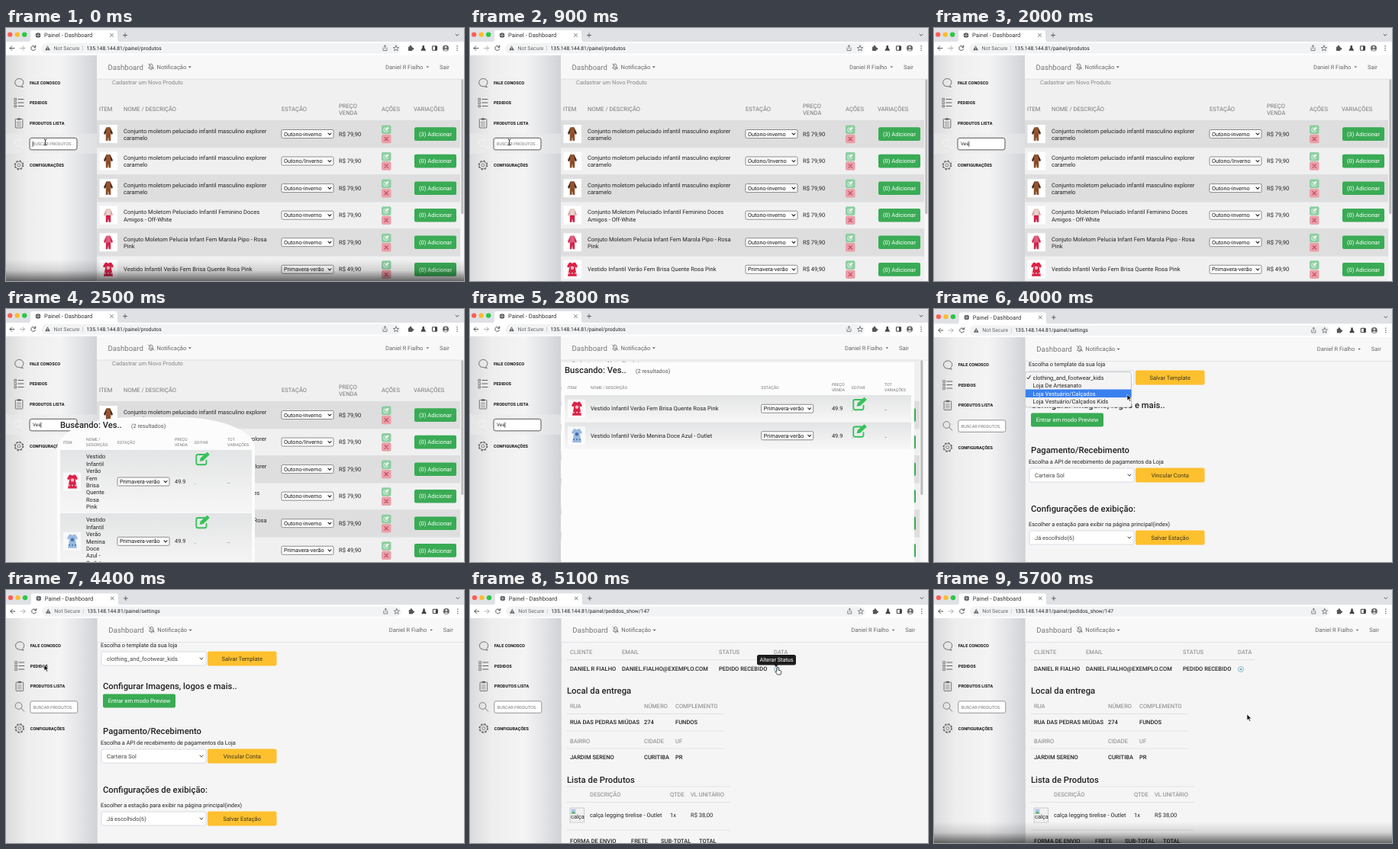
Recreate the animation shown at these times as an HTML page. Size 600 by 332 pixels, loop 5.9 s.

```html
<!DOCTYPE html>
<html lang="pt">
<head>
<meta charset="utf-8">
<style>
html, body { margin: 0; width: 100%; height: 100%; overflow: hidden; background: #fff; }
svg { display: block; width: 600px; height: 332px; font-family: Roboto, "Liberation Sans", sans-serif; text-rendering: geometricPrecision; }
</style>
</head>
<body>
<svg id="stage" viewBox="0 0 600 332"></svg>
<script>
const LOOP = 5900, STEP = 100;
const GRAY = '#777', DARK = '#222', GREEN = '#3aab55', YELLOW = '#fdc02e';
const USER = 'Daniel R Fialho';

const defs = `<defs>
<linearGradient id="side"><stop stop-color="#dadadc"/><stop offset=".25" stop-color="#eeeeef"/><stop offset=".6" stop-color="#f4f4f5"/><stop offset=".82" stop-color="#e2e3e6"/><stop offset="1" stop-color="#d0d2d6"/></linearGradient>
<linearGradient id="row" x2="0" y2="1"><stop stop-color="#e3e4e5"/><stop offset="1" stop-color="#f7f7f7"/></linearGradient>
<linearGradient id="shade" x2="0" y2="1"><stop stop-opacity="0"/><stop offset=".5" stop-opacity=".13"/><stop offset="1" stop-opacity=".58"/></linearGradient>
</defs>`;

// y is the visual middle of the line
const text = (x, y, s, size = 7.55, fill = DARK, weight = 400, anchor = 'start') =>
  `<text x="${x}" y="${y + size * .36}" font-size="${size}" fill="${fill}" font-weight="${weight}" text-anchor="${anchor}">${s}</text>`;
const rect = (x, y, w, h, fill, r = 0, extra = '') =>
  `<rect x="${x}" y="${y}" width="${w}" height="${h}" rx="${r}" fill="${fill}" ${extra}/>`;
const circle = (x, y, r, fill, extra = '') => `<circle cx="${x}" cy="${y}" r="${r}" fill="${fill}" ${extra}/>`;
const line = (d, color = '#555', w = 1) =>
  `<path d="${d}" fill="none" stroke="${color}" stroke-width="${w}" stroke-linecap="round" stroke-linejoin="round"/>`;
const shape = (d, fill, extra = '') => `<path d="${d}" fill="${fill}" ${extra}/>`;
const move = (x, y, s, extra = '') => `<g transform="translate(${x} ${y})" ${extra}>${s}</g>`;
const rule = (y, x1, x2) => line(`M${x1} ${y}H${x2}`, '#dcdee1', .8);
const lerp = (a, b, p) => a + (b - a) * p;
const clamp = v => Math.max(0, Math.min(1, v));

const button = (x, y, w, h, s, bg, fg) =>
  rect(x, y, w, h, bg, 2) + text(x + w / 2, y + h / 2, s, 7.5, fg, 400, 'middle');
const smallSelect = (x, y, s) =>
  rect(x, y - 5.5, 68, 11, '#fff', 1.5, 'stroke="#707070" stroke-width=".8"') +
  text(x + 3, y, s, 7.3, '#111') + line(`M${x + 61} ${y - 1}l2 2.2 2-2.2`, '#222', 1.1);
const bigSelect = (x, y, s) =>
  rect(x, y, 137, 18, '#fff', 2, 'stroke="#ced4da" stroke-width=".8"') +
  text(x + 7, y + 9, s, 7.5, '#444') + line(`M${x + 129} ${y + 8}l2 2.2 2-2.2`, '#444', 1);
const pencil = (x, y, k, color) => move(x, y, `<g transform="scale(${k})">` +
  line('M3-5H-5Q-7-5-7-3V5Q-7 7-5 7H3Q5 7 5 5V2', color, 1.7) +
  shape('M-3 3L-2-1 6-8 9-5 1 2.4Z', color) + '</g>');

const suit = (top, legs, sleeves) =>
  shape('M-2.5-8.5H2.5L6-1 4.5 1 2.5-2H-2.5L-4.5 1-6-1Z', sleeves) +
  shape('M-2.5-8.5H2.5L3.2 1H-3.2Z', top) +
  shape('M-3.2 0H3.2V9H.7L0 4-.7 9H-3.2Z', legs);
const dress = (main, dot) =>
  shape('M-4-9H-2Q0-7 2-9H4L7-4 5-2 3.5-4 6 9H-6L-3.5-4-5-2-7-4Z', main) +
  circle(0, -2, 2.2, dot) + [-4, 0, 4].map(x => circle(x, 5, 1, dot)).join('');
const brown = suit('#9a5128', '#8d4c29', '#33302f');
const red = dress('#db2146', '#f7bcc6'), blue = dress('#9ab9df', '#3f70b3');

const items = [
  ['Conjunto moletom peluciado infantil masculino explorer', 'caramelo', 'Outono-inverno', '79', brown],
  ['Conjunto moletom peluciado infantil masculino explorer', 'caramelo', 'Outono/Inverno', '79', brown],
  ['Conjunto moletom peluciado infantil masculino explorer', 'caramelo', 'Outono-inverno', '79', brown],
  ['Conjunto Moletom Peluciado Infantil Feminino Doces', 'Amigos - Off-White', 'Outono-inverno', '79', suit('#e5d4cd', '#cf2048', '#d8a5a2')],
  ['Conjuto Moletom Pelucia Infant Fem Marola Pipo - Rosa', 'Pink', 'Outono-inverno', '79', suit('#e0607f', '#d02750', '#d02750')],
  ['Vestido Infantil Verão Fem Brisa Quente Rosa Pink', '', 'Primavera-verão', '49', red],
];

function productList() {
  const heads = [[122, 'ITEM'], [154, 'NOME / DESCRIÇÃO'], [361, 'ESTAÇÃO'], [492, 'AÇÕES'], [534, 'VARIAÇÕES']];
  let s = rect(119, 67, 490, 265, '#f0f0f1') + text(139, 71, 'Cadastrar um Novo Produto', 7.5, '#888');
  s += heads.map(([x, h]) => text(x, 106.5, h, 7.6, GRAY)).join('');
  s += text(436, 102, 'PREÇO', 7.6, GRAY) + text(436, 111, 'VENDA', 7.6, GRAY);
  items.forEach(([a, b, season, price, art], i) => {
    const y = 139 + i * 35.55;
    s += rect(119, y - 17.6, 476, 35.5, i % 2 ? '#f0f0f1' : '#dededf') + rule(y - 17.6, 119, 595);
    s += rect(122.5, y - 12, 23.5, 24, '#fff') + move(134, y, art);
    s += text(154, b ? y - 4.2 : y, a) + text(154, y + 5.2, b);
    s += smallSelect(361, y, season) + text(436, y, `R$ ${price},90`);
    s += rect(492, y - 11.5, 12.5, 11.5, '#8dcea0', 2) + pencil(498, y - 5.7, .42, '#fff');
    s += rect(492, y + .8, 12.5, 11.5, '#e9a0a8', 2) + line(`M496 ${y + 4.4}l4.4 4.4m0-4.4l-4.4 4.4`, '#c9485a', 1.2);
    s += button(535, y - 8.7, 55, 17.6, `(${i ? 0 : 3}) Adicionar`, GREEN, '#fff');
  });
  return s + rect(595.5, 67, 4.5, 265, '#f7f7f7') + rect(596.3, 67, 3, 177, '#bbb', 1.5);
}

function wrap(s, max) {
  return s.split(' ').reduce((rows, word) => {
    const last = rows.length - 1;
    if (last >= 0 && (rows[last] + ' ' + word).length <= max) rows[last] += ' ' + word;
    else rows.push(word);
    return rows;
  }, []);
}

// Search results, opening out of the search field
function results(p) {
  const x = lerp(14, 120, p), y = lerp(214, 70, p), w = lerp(56, 462, p);
  const grow = Math.max(0, w - 259), width = Math.max(w, 180);
  const rx = Math.min(width / 2, 200 * (1 - p)), ry = 80 * (1 - p);
  const nome = x + 38, est = x + 79 + grow * .9, right = x + grow * .985;
  const outline = `M${x} 340V${y + ry}a${rx} ${ry} 0 0 1 ${rx} ${-ry}H${x + width - rx}a${rx} ${ry} 0 0 1 ${rx} ${ry}V340Z`;
  const head = (hx, a, b) => b
    ? text(hx, y + 29.5, a, 5.3, GRAY) + text(hx, y + 36, b, 5.3, GRAY)
    : text(hx, y + 33, a, 5.3, GRAY);
  let s = shape(outline, '#fcfcfc');
  s += text(x + 4, y + 10, 'Buscando: Ves..', 11.2, DARK, 500) + text(x + 97, y + 11.5, '(2 resultados)', 7.3, '#555');
  s += head(x + 7.5, 'ITEM') + (grow < 30 ? head(nome, 'NOME /', 'DESCRIÇÃO') : head(nome, 'NOME / DESCRIÇÃO'));
  s += head(est, 'ESTAÇÃO') + head(right + 154, 'PREÇO', 'VENDA') + head(right + 180, 'EDITAR') + head(right + 223, 'TOT', 'VARIAÇÕES');
  let top = y + 43;
  [['Vestido Infantil Verão Fem Brisa Quente Rosa Pink', red],
   ['Vestido Infantil Verão Menina Doce Azul - Outlet', blue]].forEach(([name, art]) => {
    const rows = wrap(name, (est - nome - 6) / 4.2);
    const h = Math.max(35.5, rows.length * 9.4 + 7.8), mid = top + h / 2;
    s += rect(x + 4, top, width - 8, h - .5, 'url(#row)');
    s += rect(x + 8, mid - 12, 23, 24, '#fff', 0, 'opacity=".7"') + move(x + 20, mid, art);
    rows.forEach((r, i) => s += text(nome, mid + (i - (rows.length - 1) / 2) * 9.4, r, 7.5));
    s += smallSelect(est, mid, 'Primavera-verão') + text(right + 154, mid, '49.9', 7.4);
    s += pencil(right + 190, top + 11.5, 1.1, '#37c25c');
    s += text(right + 180, mid + 1, '.', 7) + text(right + 223, mid, '..', 7);
    top += h;
  });
  return `<g opacity="${clamp(p * 2.5)}">${s}</g>`;
}

const title = (y, s) => text(127, y, s, 11.3, DARK, 500);

function settings(open) {
  const action = (y, s) => button(264, y, 90.5, 19, s, YELLOW, '#3b3520');
  let s = rect(119, 67, 481, 265, '#f5f5f6');
  s += text(124, 72.5, 'Escolha o template da sua loja', 7.4) + bigSelect(125, 81, 'clothing_and_footwear_kids') + action(80.5, 'Salvar Template');
  s += title(126, 'Configurar Imagens, logos e mais..') + button(127, 136.5, 95, 18, 'Entrar em modo Preview', GREEN, '#fff');
  s += title(185, 'Pagamento/Recebimento') + text(124, 200.8, 'Escolha a API de recebimento de pagamentos da Loja', 7.4);
  s += bigSelect(125, 209, 'Carteira Sol') + action(208.5, 'Vincular Conta');
  s += title(262, 'Configurações de exibição:') + text(124, 282.5, 'Escolher a estação para exibir na página principal(index)', 7.4);
  s += bigSelect(125, 291, 'Já escolhido(6)') + action(290.5, 'Salvar Estação');
  if (!open) return s;
  s += rect(119.5, 82.5, 139, 46.5, '#f4f4f5', 3, 'stroke="#b9b9bb" stroke-width=".8"') + rect(119.5, 105.5, 139, 10.6, '#3a80ee');
  s += line('M122 90l1.5 2 2.8-4.5', '#222', 1);
  ['clothing_and_footwear_kids', 'Loja De Artesanato', 'Loja Vestuário/Calçados', 'Loja Vestuário/Calçados Kids']
    .forEach((o, i) => s += text(129.5, 89.8 + i * 10.5, o, 7.5, i == 2 ? '#fff' : DARK));
  return s;
}

function order(tip) {
  const cells = (y, xs, names, head) =>
    names.map((n, i) => text(xs[i], y, n, 7.55, head ? '#808080' : DARK, head ? 400 : 500)).join('');
  const a = [131, 199, 326, 398], b = [131, 228, 269], c = [157, 262, 289];
  let s = rect(119, 67, 481, 265, '#f5f5f6');
  s += cells(81.5, a, ['CLIENTE', 'EMAIL', 'STATUS', 'DATA'], 1) + rule(91.5, 127, 420);
  s += cells(103, a, [USER.toUpperCase(), 'DANIEL.FIALHO@EXEMPLO.COM', 'PEDIDO RECEBIDO']);
  s += circle(402, 104, 3.5, '#e8f3f8', 'stroke="#7eabc1" stroke-width=".8"') + circle(402, 104, 1.3, '#7eabc1');
  s += title(132, 'Local da entrega') + cells(152.5, b, ['RUA', 'NÚMERO', 'COMPLEMENTO'], 1) + rule(162.5, 127, 332);
  s += cells(173.5, b, ['RUA DAS PEDRAS MIÚDAS', '274', 'FUNDOS']) + rule(185, 127, 332);
  s += cells(198, b, ['BAIRRO', 'CIDADE', 'UF'], 1) + rule(208, 127, 332) + cells(219, b, ['JARDIM SERENO', 'CURITIBA', 'PR']);
  s += title(248.5, 'Lista de Produtos') + rule(258, 127, 340) + cells(268.5, c, ['DESCRIÇÃO', 'QTDE', 'VL UNITÁRIO'], 1) + rule(278.5, 127, 340);
  s += rect(131, 286, 18.5, 19, '#f2f2f2', 0, 'stroke="#bbb" stroke-width=".7"') + rect(132.5, 287.5, 6, 6, '#a9c8e5') +
    shape('M132.5 293.5l3-3 3 3Z', '#5ba65c') + text(132, 297.5, 'calça', 7.5);
  s += text(157, 295.5, 'calça legging tirelise - Outlet') + text(262, 295.5, '1x') + text(289, 295.5, 'R$ 38,00');
  s += rule(315, 127, 340) + cells(329, [131, 211, 250, 300], ['FORMA DE ENVIO', 'FRETE', 'SUB-TOTAL', 'TOTAL']);
  if (tip) s += rect(376, 85, 51, 13.5, '#1d1d1d', 2.5) + shape('M398.5 98h5l-2.5 3Z', '#1d1d1d') +
    text(401.5, 91.7, 'Alterar Status', 7.3, '#fff', 400, 'middle');
  return s;
}

function browser(path) {
  let s = rect(-2, -4, 610, 22, '#dfe1e5') + shape('M29 18Q32 18 32 15V6Q32 3 35 3H143Q146 3 146 6V15Q146 18 149 18Z', '#fff');
  ['#fb5f57', '#fcbc2f', '#2bc840'].forEach((c, i) => s += circle(5.2 + i * 9.5, 8.6, 3.2, c));
  s += circle(42, 9.5, 3.3, '#54585c') + line('M39.6 9.5h4.8M42 7v5', '#ddd', .6) + text(50, 9.3, 'Painel - Dashboard', 7.6, '#333');
  s += line('M136.5 7.5l4 4m0-4l-4 4', '#555', .8) + line('M153.5 9.5h5m-2.5-2.5v5', '#555', .9);
  s += line('M589 8.2l2 2 2-2', '#444', .9);
  s += rect(-2, 18, 610, 17.5, '#fff') + rect(46, 20, 471, 13.5, '#f1f3f4', 6.7);
  s += line('M11 26.5H5m2.7-2.7L5 26.5l2.7 2.7', '#555', 1) + line('M18.5 26.5h6m-2.7-2.7l2.7 2.7-2.7 2.7', '#b0b0b0', 1);
  s += line('M38.5 25a3 3 0 1 0 .2 2.5M38.8 23v2.3h-2.3', '#555', 1);
  s += shape('M54.5 23.2l3.4 6h-6.8Z', '#5f6368') + line('M54.5 25.5v1.4m0 1.2v.1', '#fff', .7);
  s += text(62.5, 26.5, 'Not Secure', 6.9, '#666') + line('M100.5 23.5v6', '#bbb', .6) + text(105.5, 26.5, '135.148.144.81/painel/' + path, 6.8, '#222');
  s += line('M494 26v3.5h5V26m-2.5 1v-4.2m-1.5 1.4l1.5-1.5 1.5 1.5', '#666', .8);
  s += line('M511 23l1 2.4 2.6.2-2 1.7.7 2.5-2.3-1.4-2.3 1.4.7-2.5-2-1.7 2.6-.2Z', '#666', .8);
  s += rect(527, 24.5, 5.5, 5.5, '#555', .8) + circle(530, 24, 1.3, '#555') + circle(533, 27.2, 1.3, '#555');
  s += shape('M545.5 23h2.5v2.5l2.2 4.3h-6.9l2.2-4.3Z', '#444') + rect(558.5, 23.7, 6, 5.5, 'none', .8, 'stroke="#444" stroke-width="1.1"') + rect(562, 23.7, 2.5, 5.5, '#444');
  s += circle(576, 26.5, 4, '#666') + circle(576, 25.2, 1.4, '#ddd') + shape('M573.3 29q2.7-3 5.4 0-2.7 2-5.4 0Z', '#ddd');
  [23.8, 26.5, 29.2].forEach(y => s += circle(591, y, .75, '#555'));
  return s;
}

function sidebar(active, typed, caret) {
  const label = (y, s) => text(31, y, s, 5.6, '#111', 700);
  let s = rect(-2, 35.5, 121, 300, 'url(#side)');
  if (active) s += rect(-2, 138.5, 121, 26.5, '#eee', 0, 'opacity=".5"');
  s += label(71.5, 'FALE CONOSCO') + label(98, 'PEDIDOS') + label(124.8, 'PRODUTOS LISTA') + label(180, 'CONFIGURAÇÕES');
  s += line('M13.5 75.5a5.7 5.2 0 1 1 7 .4l2 1.7-4.5-.9a5.7 5.2 0 0 1-4.5-1.2', '#555', .8);
  [93.5, 98, 102.5].forEach(y => s += rect(11, y - 1.2, 2.6, 2.6, 'none', 0, 'stroke="#555" stroke-width=".7"') + line(`M16 ${y}H23`, '#555', .9));
  s += rect(12.3, 119.5, 9.6, 11.5, 'none', .8, 'stroke="#555" stroke-width=".8"') + rect(15, 118.2, 4.2, 2.5, '#666', .5) +
    line('M14.5 123.5h5m-5 2.4h5m-5 2.4h5', '#666', .7);
  const glass = active ? '#f7f7f7' : '#666';
  s += circle(15.7, 150.5, 4.4, 'none', `stroke="${glass}" stroke-width=".8"`) + line('M19 153.8l4 4', glass, .9);
  s += circle(17, 180, 5.6, 'none', 'stroke="#555" stroke-width="1.3" stroke-dasharray="2.2 2.2"') +
    circle(17, 180, 4.8, 'none', 'stroke="#555" stroke-width=".7"') + circle(17, 180, 2, 'none', 'stroke="#555" stroke-width=".7"');
  s += rect(31, 144.3, 62, 15.6, '#fff', 2.5, `stroke="${active ? '#444' : '#888'}" stroke-width=".9"`);
  s += typed ? text(35, 152.2, typed, 6.3, '#222') : text(35, 152.2, 'BUSCAR PRODUTOS..', 5.5, '#777');
  if (caret) s += line(`M${35.2 + typed.length * 3.55} 149v6.5`, '#111', .7);
  return s;
}

function topbar(shift) {
  let s = rect(119, 35.5, 490, 31.5, '#f8f8f9') + rule(67, 119, 609);
  s += text(133.5, 51.1, 'Dashboard', 9.6, GRAY);
  s += line('M187 52.5q1-1 1-3 0-2.5 2-2.5t2 2.5q0 2 1 3Zm2 1.8h2M186.5 47l7 7', '#666', .8);
  s += text(197.5, 51.1, 'Notificação', 7.6, '#666') + shape('M238.8 50.3h4l-2 2.2Z', '#666');
  return s + move(shift, 0, text(497, 51.1, USER, 7.5, '#666') + shape('M550.5 50.3h3.6l-1.8 2Z', '#666') + text(568, 51.1, 'Sair', 7.5, '#666'));
}

const route = [[3200, 150, 190], [3400, 55, 180], [3600, 180, 88], [3800, 200, 92], [4000, 253, 112],
  [4200, 240, 112], [4400, 50, 98], [4700, 300, 120], [4900, 403, 104], [5300, 403, 104], [5600, 410, 163]];

function pointer(t, hand) {
  if (t < 1000) return move(51.5, 149.5, line('M-1.5-3.5Q0-3.5 0-2V3Q0 4.5-1.5 4.5M1.5-3.5Q0-3.5 0-2M0 3Q0 4.5 1.5 4.5', '#222', .9));
  if (t < route[0][0]) return '';
  const i = route.findIndex(k => k[0] >= t);
  const b = route[i < 0 ? route.length - 1 : i], a = route[i > 0 ? i - 1 : 0];
  const p = b[0] > a[0] ? clamp((t - a[0]) / (b[0] - a[0])) : 1, e = p * p * (3 - 2 * p);
  const art = hand
    ? shape('M-1.2-2Q0-3.2 1 -2V1.2L4.3 2Q5 2.3 4.7 4L4 7H-.2L-3 3.6Q-3 2.2-1.2 3.2Z', '#fff', 'stroke="#222" stroke-width=".8"')
    : shape('M0 0V8l1.9-1.7L3.2 9.2l1.4-.6L3.3 5.8H5.8Z', '#111', 'stroke="#fff" stroke-width=".6"');
  return move(lerp(a[1], b[1], e), lerp(a[2], b[2], e), art);
}

// Dark foot of the video, seen around the loop point
function footShade(t) {
  const strength = Math.max(clamp((900 - t) / 400), clamp((t - 5400) / 200));
  return strength ? rect(0, 304, 600, 28, 'url(#shade)', 0, `opacity="${strength}"`) : '';
}

function draw(t) {
  const typed = 'Ves'.slice(0, t < 1500 ? 0 : Math.floor((t - 1300) / 200));
  const inList = t < 3500, inOrder = t >= 4500, tip = t >= 4900 && t < 5400;
  const open = clamp((t - 2200) / 600);
  const caret = t < 3000 && (t < 500 || t >= 1400 || t % 1000 < 500);
  const path = inList ? 'produtos' : inOrder ? 'pedidos_show/147' : 'settings';
  const shift = inList ? (t >= 2800 ? -6 : 0) : inOrder ? 1.5 : 4;
  const frame = s => inList ? s : move(.8, 1.5, s);
  const page = inList ? move(shift, 0, productList()) : inOrder ? order(tip) : settings(t >= 3600 && t < 4300);
  const edge = shift < 0 ? rect(594, 67, 6, 265, '#fafafa') : '';
  return defs + page + edge + frame(sidebar(inList, inList ? typed : '', inList && caret)) +
    (inList && open > 0 ? results(open) : '') +
    frame(topbar(shift) + browser(path)) + pointer(t, tip) + footShade(t);
}

const stage = document.getElementById('stage'), start = performance.now();
let shown = -1;
function tick() {
  const t = Math.floor((performance.now() - start) % LOOP / STEP) * STEP;
  if (t !== shown) stage.innerHTML = draw(shown = t);
  requestAnimationFrame(tick);
}
tick();
</script>
</body>
</html>
```
